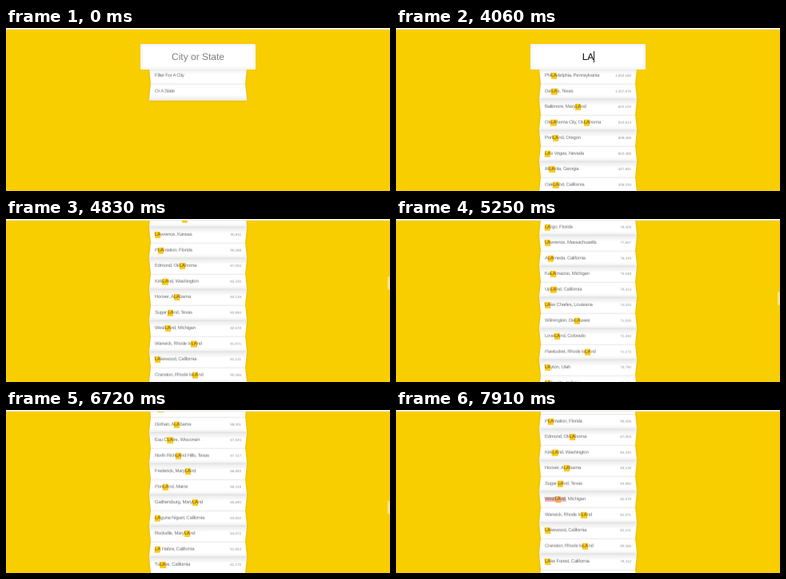
Recreate the animation shown at these times as an HTML page. Size 480 by 204 pixels, loop 8000 ms.

```html
<!DOCTYPE html>
<html lang="en">
<head>
<meta charset="utf-8">
<title>City search</title>
<style>
  html, body { margin: 0; width: 100%; height: 100%; overflow: hidden; background: #f9ce00; }
  body { position: relative; font: 6px/7.2px "Liberation Sans", Arial, sans-serif; text-rendering: geometricPrecision; }
  #strip { position: absolute; z-index: 3; top: 0; width: 100%; height: 1px; background: #fff; border-bottom: 1px solid rgba(228,226,216,.8); }
  #page { position: absolute; left: 180px; top: 0; width: 120px; }
  #search {
    position: absolute; z-index: 2; left: -12px; top: 20px; width: 144px; height: 32px; box-sizing: border-box;
    display: flex; align-items: center; justify-content: center;
    font-size: 12px; line-height: 14px; background: #fff; border: 3px solid #f7f7f7; border-radius: 1.5px;
    box-shadow: 0 0 1.5px rgba(0,0,0,.12), inset 0 0 .6px rgba(0,0,0,.19);
  }
  #hint { position: absolute; width: 100%; text-align: center; color: #808080; }
  #caret { width: 1px; height: 14px; margin-right: -1px; background: #222; }
  ul {
    position: absolute; top: 50px; width: 100%; margin: 0; padding: 0; list-style: none;
    background: linear-gradient(#e6e6e6, #e6e6e6) center / 117.5px 100% no-repeat;
  }
  li {
    display: flex; justify-content: space-between; align-items: flex-start; box-sizing: border-box;
    height: 19.5px; padding: 6px; white-space: pre; color: #6e6e6e; box-shadow: 0 0 3px rgba(0,0,0,.14);
  }
  li:nth-child(odd) { transform: perspective(30px) rotateX(-3deg) translateY(.9px); background: linear-gradient(to top, #fff 65%, #ebebeb); }
  li:nth-child(even) { transform: perspective(30px) rotateX(3deg) translateY(.6px) scale(1.001); background: linear-gradient(#fff 65%, #ebebeb); }
  .name { letter-spacing: -.26px; }
  .count { font-size: 4.5px; line-height: 5.4px; color: #929292; }
  mark { padding: .6px 0; letter-spacing: 0; background: #fbc91a; color: #5c4c10; }
  .selected { background: #f3b9b2; }
  .selected mark { background: #f2ab62; }
  #thumb { position: absolute; right: 0; top: 0; width: 3px; height: 17px; border-radius: 1.5px; background: #f9e483; }
</style>
</head>
<body>
<div id="page">
  <div id="search"><span id="hint">City or State</span><span id="typed"></span><span id="caret"></span></div>
  <ul id="tips"><li><span class="name">Filter For A City</span></li><li><span class="name">Or A State</span></li></ul>
  <ul id="cities"></ul>
</div>
<div id="strip"></div>
<div id="thumb"></div>
<script>
const $ = id => document.getElementById(id);
const LOOP = 8000, TICK = 70;

const rows = `Philadelphia, Pennsylvania 1,553,165
Dallas, Texas 1,257,676
Baltimore, Maryland 622,104
Oklahoma City, Oklahoma 610,613
Portland, Oregon 609,456
Las Vegas, Nevada 603,488
Atlanta, Georgia 447,841
Oakland, California 406,253
Tulsa, Oklahoma 398,121
Cleveland, Ohio 390,113
Plano, Texas 274,409
Chula Vista, California 256,780
Orlando, Florida 255,483
Laredo, Texas 248,142
Garland, Texas 234,566
North Las Vegas, Nevada 226,877
Birmingham, Alabama 212,113
Montgomery, Alabama 201,332
Salt Lake City, Utah 191,180
Mobile, Alabama 189,572
Huntsville, Alabama 186,254
Overland Park, Kansas 181,260
Santa Clarita, California 179,590
Providence, Rhode Island 177,994
Fort Lauderdale, Florida 172,389
Lancaster, California 159,523
Lakewood, Colorado 147,214
Clarksville, Tennessee 142,357
Olathe, Kansas 131,885
Lafayette, Louisiana 124,276
Midland, Texas 123,933
Santa Clara, California 120,245
Norman, Oklahoma 118,197
Lansing, Michigan 113,972
Temecula, California 106,780
Broken Arrow, Oklahoma 103,500
Las Cruces, New Mexico 101,324
Lakeland, Florida 100,710
Lawton, Oklahoma 97,151
Tuscaloosa, Alabama 95,334
Lawrence, Kansas 90,811
Plantation, Florida 90,268
Edmond, Oklahoma 87,004
Kirkland, Washington 84,430
Hoover, Alabama 84,126
Sugar Land, Texas 83,860
Westland, Michigan 82,578
Warwick, Rhode Island 81,971
Lakewood, California 81,121
Cranston, Rhode Island 80,566
Lake Forest, California 79,312
Largo, Florida 78,409
Lawrence, Massachusetts 77,657
Alameda, California 76,419
Kalamazoo, Michigan 75,548
Upland, California 75,413
Lake Charles, Louisiana 74,024
Wilmington, Delaware 71,525
Loveland, Colorado 71,334
Pawtucket, Rhode Island 71,172
Layton, Utah 70,790
Lafayette, Indiana 70,373
Lauderhill, Florida 69,813
Palatine, Illinois 69,350
Flagstaff, Arizona 68,667
Dothan, Alabama 68,001
Eau Claire, Wisconsin 67,545
North Richland Hills, Texas 67,317
Frederick, Maryland 66,893
Portland, Maine 66,318
Gaithersburg, Maryland 65,690
Laguna Niguel, California 64,652
Rockville, Maryland 64,072
La Habra, California 61,653
Tulare, California 61,170
Lancaster, Pennsylvania 59,325
Lakewood, Washington 59,097
Auburn, Alabama 58,582
Lakeville, Minnesota 58,562
Moore, Oklahoma 58,414
Bowie, Maryland 56,759
Midwest City, Oklahoma 56,756
Woodland, California 56,590`.split("\n");

const highlight = text => text.replace(/la/gi, "<mark>LA</mark>");
$("cities").innerHTML = rows.map(row => {
  const [, city, state, count] = row.match(/(.+), (.+) (\S+)/);
  return `<li><span class="name"><span>${highlight(city)}</span>, ${highlight(state)}</span><span class="count">${count}</span></li>`;
}).join("");
const westland = $("cities").children[rows.findIndex(row => row.startsWith("Westland"))].querySelector(".name span");

// Scroll positions [ms, px], joined by a smooth curve that rests where the direction turns.
const scrollKeys = [[4060, 0], [4200, 110], [4480, 469], [4830, 820], [5250, 1044], [5530, 1085],
  [6020, 1085], [6370, 1400], [6580, 1400], [6720, 1309], [7000, 980], [7210, 845]];

function slope(i) {
  const [a, b, c] = [scrollKeys[i - 1], scrollKeys[i], scrollKeys[i + 1]];
  if (!a || !c || (b[1] - a[1]) * (c[1] - b[1]) <= 0) return 0;
  return (c[1] - a[1]) / (c[0] - a[0]);
}

function scrollAt(t) {
  const i = scrollKeys.findIndex(key => t < key[0]);
  if (i === 0) return 0;
  if (i < 0) return scrollKeys.at(-1)[1];
  const [t0, y0] = scrollKeys[i - 1], [t1, y1] = scrollKeys[i];
  const span = t1 - t0, u = (t - t0) / span, v = 1 - u;
  return y0 * v * v * (1 + 2 * u) + y1 * u * u * (3 - 2 * u) + span * u * v * (slope(i - 1) * v - slope(i) * u);
}

function draw(now) {
  const t = Math.min(Math.floor(now % LOOP / TICK), 113) * TICK;
  const scroll = scrollAt(t);
  const show = (id, on) => $(id).style.visibility = on ? "visible" : "hidden";

  $("typed").textContent = t < 2800 ? "" : t < 3080 ? "L" : "LA";
  show("hint", t < 2800);
  show("caret", t >= 1400 && t < 1960 || t >= 2450);
  show("tips", t < 3150);
  show("cities", t >= 3150);
  westland.className = t >= 7770 ? "selected" : "";

  $("page").style.transform = `translateY(${-scroll}px)`;
  $("thumb").style.transform = `translateY(${2 + scroll * .0852}px)`;
  $("thumb").style.opacity = t <= 4060 ? 0 : Math.min(1, (7910 - t) / 210);
  requestAnimationFrame(draw);
}
requestAnimationFrame(draw);
</script>
</body>
</html>
```
